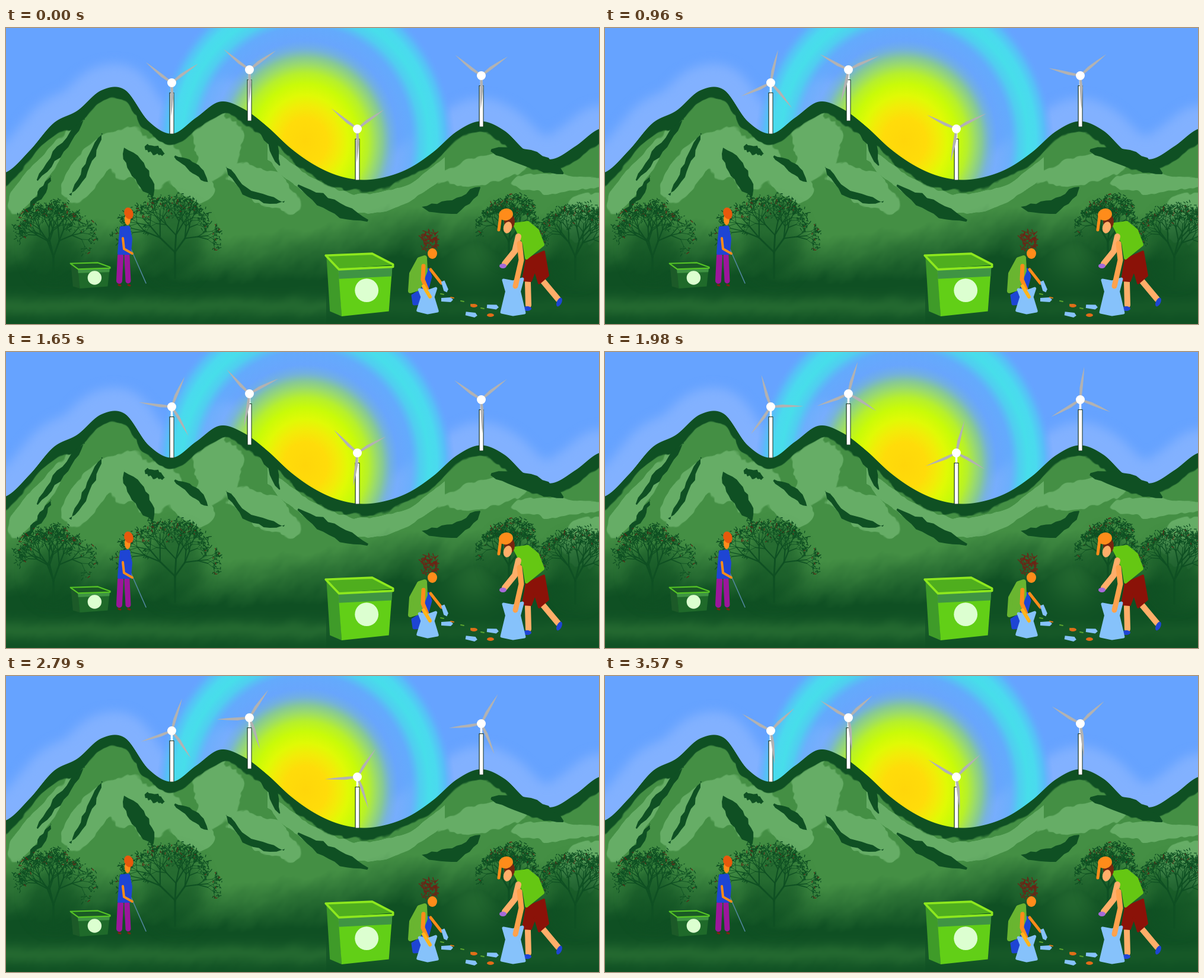
These frames come from a looping animation (1000x500 px, 3.6 s). An HTML page with a canvas:

```html
<!DOCTYPE html>
<html lang="en">
<head>
<meta charset="utf-8">
<title>Clean hills</title>
<style>
html, body { margin: 0; width: 100%; height: 100%; overflow: hidden; background: #66a3ff; }
canvas { display: block; width: 1000px; height: 500px; }
</style>
</head>
<body>
<canvas id="stage" width="1000" height="500"></canvas>
<script>
const W = 1000, H = 500, TAU = Math.PI * 2, RAD = Math.PI / 180;
const stage = document.getElementById('stage').getContext('2d');
const scenery = document.createElement('canvas');
scenery.width = W;
scenery.height = H;
const g = scenery.getContext('2d', { willReadFrequently: true });

const DARK = '#0f5023', SKIN = '#ff8c1a', PALE = '#ffae69', BAG = '#86c2fb', BLUE = '#1e45d4';
const TONES = [[15, 80, 35], [68, 143, 68], [102, 173, 102]];

let seed = 7;
const rnd = () => (seed = (seed * 16807) % 2147483647) / 2147483647;
const jitter = a => (rnd() * 2 - 1) * a;
const clamp = v => Math.min(1, Math.max(0, v));
const mix = (a, b, t) => a + (b - a) * t;
const bell = (x, mid, width) => Math.exp(-(((x - mid) / width) ** 2));

function hash(i, j) {
  const v = Math.sin(i * 127.1 + j * 311.7) * 43758.5453;
  return v - Math.floor(v);
}

function noise(x, y) {
  const i = Math.floor(x), j = Math.floor(y), ease = t => t * t * (3 - 2 * t);
  const u = ease(x - i), v = ease(y - j);
  return mix(mix(hash(i, j), hash(i + 1, j), u), mix(hash(i, j + 1), hash(i + 1, j + 1), u), v);
}

const grain = (x, y) => noise(x, y) * 0.6 + noise(x * 2.3, y * 2.3) * 0.27 + noise(x * 5.1, y * 5.1) * 0.13;

// Drawing helpers take flat x, y pairs
function trace(xy) {
  g.beginPath();
  for (let i = 0; i < xy.length; i += 2) g.lineTo(xy[i], xy[i + 1]);
}

function poly(color, ...xy) {
  trace(xy);
  g.fillStyle = color;
  g.fill();
}

function line(color, width, ...xy) {
  trace(xy);
  g.strokeStyle = color;
  g.lineWidth = width;
  g.lineCap = g.lineJoin = 'round';
  g.stroke();
}

// Filled shape with rounded corners
function soft(color, round, ...xy) {
  poly(color, ...xy);
  line(color, round, ...xy, xy[0], xy[1]);
}

function oval(color, x, y, rx, ry = rx, turn = 0) {
  g.beginPath();
  g.ellipse(x, y, rx, ry, turn * RAD, 0, TAU);
  g.fillStyle = color;
  g.fill();
}

// Skyline height every 40 px, joined by a spline
const RIDGE = [243, 206, 160, 139, 105, 104, 157, 178, 151, 124, 136, 166, 203, 231, 249, 256, 251, 236, 209, 174, 157, 173, 210, 221, 199, 170];

function ridge(x) {
  const i = Math.floor(x / 40), t = x / 40 - i;
  const at = k => RIDGE[Math.min(RIDGE.length - 1, Math.max(0, k))];
  const [a, b, c, d] = [at(i - 1), at(i), at(i + 1), at(i + 2)];
  return b + t / 2 * (c - a + t * (2 * a - 5 * b + 4 * c - d + t * (3 * (b - c) + d - a)));
}

function sky() {
  g.fillStyle = '#66a3ff';
  g.fillRect(0, 0, W, H);
  g.filter = 'blur(9px)';
  const skyline = [];
  for (let x = -20; x <= W + 20; x += 10) skyline.push(x, ridge(Math.min(W, Math.max(0, x))));
  line('#82b1ff', 78, ...skyline);
  g.filter = 'none';

  const R = 252, glow = g.createRadialGradient(0, 0, 0, 0, 0, R);
  const bands = { 0: '#ffd60a', 36: '#ffdc0a', 56: '#f2ec08', 72: '#e0fa05', 90: '#c9fb08', 106: '#b6f02c', 119: '#9cdc68',
    131: '#86c898', 143: '#76b4d4cc', 157: '#6aa9fa77', 178: '#62aefbaa', 193: '#50cdf0', 208: '#47deea', 222: '#4adaee', 236: '#58bdf8' };
  for (const r in bands) glow.addColorStop(r / R, bands[r]);
  glow.addColorStop(1, '#66a3ff00');
  g.save();
  g.translate(505, 192);
  g.scale(1, 1.09);
  g.fillStyle = glow;
  g.fillRect(-R, -R, R * 2, R * 2);
  g.restore();
}

// Sunlit faces: centre, radii and tilt
const FACES = [[60, 240, 82, 21, -52], [138, 235, 72, 30, -55], [235, 222, 82, 48, 10], [352, 190, 42, 60, 0],
  [310, 262, 48, 26, 40], [440, 272, 66, 30, 30], [800, 240, 78, 26, -12], [930, 262, 80, 18, 0], [975, 318, 42, 50, 0]]
  .map(([x, y, rx, ry, tilt]) => ({ x, y, rx, ry, cos: Math.cos(tilt * RAD), sin: Math.sin(tilt * RAD) }));

function sunlit(x, y, depth) {
  let best = x > 440 && x < 740 ? 1 - Math.abs(depth - 40) / 18 : -1;
  for (const f of FACES) {
    const dx = x - f.x, dy = y - f.y;
    best = Math.max(best, 1 - Math.hypot((dx * f.cos + dy * f.sin) / f.rx, (dy * f.cos - dx * f.sin) / f.ry));
  }
  return best;
}

function hills() {
  const image = g.getImageData(0, 0, W, H), px = image.data;
  for (let x = 0; x < W; x++) {
    const top = ridge(x);
    const shadeTop = 318 + 30 * bell(x, 390, 150) - 20 * bell(x, 720, 130);
    for (let y = Math.floor(top); y < H; y++) {
      const depth = y - top, n = grain((x + y * 0.5) / 34, y / 42);
      const body = clamp((depth - 8 - 22 * n) / 3);
      const face = clamp((sunlit(x, y, depth) + (n - 0.5) * 0.8 - 0.06) / 0.05) * body;
      const spot = 0.35 * bell(x, 790, 45) * bell(y, 380, 45) + 0.3 * bell(x, 985, 40) * bell(y, 385, 40);
      const grass = 0.38 * bell(y, 465 + 10 * n, 17) * (x < 540 ? 1 : 0.35);
      const light = Math.max(1 - clamp((y - shadeTop + 30 * (n - 0.5)) / 88), spot, grass);
      const edge = clamp(y - top + 0.5), at = (y * W + x) * 4;
      for (let c = 0; c < 3; c++) {
        const lit = mix(mix(TONES[0][c], TONES[1][c], body), TONES[2][c], face);
        px[at + c] = mix(px[at + c], mix(TONES[0][c], lit, light), edge);
      }
    }
  }
  g.putImageData(image, 0, 0);
}

// Dark cleft, thick in the middle, with a ragged edge
function cleft(x, y, u, v, width, bend) {
  const len = Math.hypot(u - x, v - y), nx = (y - v) / len, ny = (u - x) / len, left = [], right = [];
  for (let i = 0; i <= 12; i++) {
    const t = i / 12, arch = Math.sin(t * Math.PI), half = width / 2 * Math.sqrt(arch);
    const cx = mix(x, u, t) + nx * bend * arch, cy = mix(y, v, t) + ny * bend * arch;
    const a = half + jitter(2.5), b = half + jitter(2.5);
    left.push(cx + nx * a, cy + ny * a);
    right.unshift(cx - nx * b, cy - ny * b);
  }
  poly(DARK, ...left, ...right);
}

function clefts() {
  cleft(197, 203, 248, 284, 27, -3);
  cleft(234, 200, 268, 212, 14, 0);
  cleft(284, 217, 341, 260, 15, -5);
  cleft(371, 235, 469, 294, 13, 17);
  cleft(108, 282, 162, 178, 10, 4);
  cleft(28, 318, 76, 250, 9, 3);
  cleft(52, 257, 132, 153, 12, 0);
  cleft(388, 138, 462, 232, 16, -14);
  cleft(492, 266, 610, 326, 22, 5);
  cleft(702, 304, 800, 270, 24, 14);
  cleft(818, 206, 940, 246, 26, -6);
}

function leaf(x, y, size, color) {
  line(color, 1.3, x, y, x + jitter(size), y + jitter(size));
}

function branch(x, y, angle, length, depth) {
  const u = x + Math.cos(angle) * length, v = y + Math.sin(angle) * length;
  line(DARK, Math.max(0.8, depth * 0.7), x, y, u, v);
  if (!depth) {
    for (let i = 0; i < 5; i++) leaf(u + jitter(5), v + jitter(5), 4, rnd() < 0.08 ? '#5a2a16' : DARK);
    return;
  }
  for (const side of [-1, 0, 1]) {
    if (side || depth > 2) branch(u, v, angle + side * 0.58 + jitter(0.25), length * mix(0.66, 0.84, rnd()), depth - 1);
  }
}

function tree(x, base, height) {
  g.filter = 'blur(12px)';
  oval('#0f502390', x, base - height * 0.38, height * 0.3, height * 0.4);
  g.filter = 'none';
  branch(x, base, -Math.PI / 2, height * 0.27, 5);
}

function bin(x, y, w, h, face, side, inside, rim) {
  const at = (...uv) => uv.map((k, i) => i % 2 ? y + k * h : x + k * w);
  poly(side, ...at(0.02, 0.05, 0.2, 0.24, 0.24, 1, 0.07, 0.92));
  poly(face, ...at(0.19, 0.24, 0.97, 0.2, 0.92, 0.92, 0.24, 1));
  poly('#3f9443', ...at(0.19, 0.25, 0.97, 0.22, 0.96, 0.37, 0.2, 0.41));
  poly(inside, ...at(0.02, 0.05, 0.68, 0.02, 0.97, 0.19, 0.2, 0.25));
  line(rim, w / 32, ...at(0.01, 0.04, 0.68, 0.01, 0.98, 0.18, 0.98, 0.22, 0.2, 0.26, 0.01, 0.04));
  oval('#dcffd0', ...at(0.6, 0.59), w * 0.17);
}

function sweeper() {
  line('#5287a0', 1.6, 211, 374, 236, 431);
  line('#9c169c', 10, 193, 385, 191, 427);
  line('#9c169c', 9, 204, 385, 206, 427);
  for (const x of [190, 206]) line('#7a2312', 3, x, 434, x + 3, 435);
  soft(BLUE, 4, 194, 337, 207, 336, 211, 356, 209, 381, 190, 381, 192, 356);
  line(SKIN, 4, 197, 355, 199, 373, 213, 381);
  oval(SKIN, 205, 323, 5, 10);
  oval('#e8590c', 207, 313, 7.5, 10, -20);
}

function picker() {
  for (let i = 0; i < 90; i++) leaf(714 + jitter(13), 360 + jitter(17), 6, '#6d2416');
  soft(BLUE, 5, 686, 452, 702, 442, 712, 408, 716, 420, 704, 465, 688, 466);
  soft('#69b530', 8, 682, 444, 684, 415, 697, 391, 706, 388, 707, 410, 695, 440);
  oval(SKIN, 719, 381, 8, 9);
  line(SKIN, 7, 704, 402, 703, 425, 712, 447);
  line(SKIN, 5, 716, 408, 734, 431);
}

function sack(x, y, w, h) {
  soft(BAG, 5, x - w * 0.38, y + 2, x, y + 5, x + w * 0.38, y, x + w * 0.25, y + h * 0.35,
    x + w * 0.45, y + h - 3, x, y + h, x - w * 0.45, y + h - 4, x - w * 0.25, y + h * 0.35);
}

function collector() {
  line(PALE, 10, 880, 430, 881, 468);
  line(PALE, 10, 906, 428, 931, 458);
  oval(BLUE, 879, 474, 7, 4);
  oval(BLUE, 933, 463, 4, 8, 25);
  soft('#8b1208', 4, 878, 391, 907, 378, 914, 418, 899, 431, 892, 408, 885, 427, 872, 426);
  soft('#65c713', 6, 858, 332, 880, 329, 896, 342, 905, 366, 878, 388, 874, 363);
  oval('#76260f', 849, 327, 9, 13);
  oval(PALE, 846, 337, 7, 10, 15);
  oval(SKIN, 843, 315, 12, 10, -15);
  line(SKIN, 5, 834, 318, 831, 341);
  line(PALE, 10, 864, 352, 858, 377, 841, 398);
  sack(855, 424, 42, 60);
  line('#ffa24d', 9, 866, 364, 869, 392, 859, 436);
  oval('#a66ad8', 838, 402, 6, 4);
}

function litter() {
  for (const [x, y, turn] of [[744, 459, 0], [785, 484, 10], [821, 471, 5], [740, 437, 70]]) {
    g.save();
    g.translate(x, y);
    g.rotate(turn * RAD);
    poly(BAG, -10, -3, 6, -4, 10, 0, 6, 4, -10, 3);
    g.restore();
  }
  for (const [x, y] of [[789, 469], [817, 485]]) oval('#e26b18', x, y, 6, 3);
  for (let i = 0; i < 5; i++) line(i % 2 ? '#d8781b' : '#5aa32f', 2, 733 + i * 17, 449 + i * 6, 738 + i * 17, 450 + i * 6);
}

function paintScenery() {
  sky();
  hills();
  clefts();
  tree(80, 422, 132);
  tree(285, 422, 160);
  tree(960, 425, 145);
  tree(848, 390, 110);
  bin(108, 396, 69, 44, '#1f6a2a', '#1c5a28', '#1a5a25', '#55c425');
  sweeper();
  bin(538, 380, 117, 107, '#62cf17', '#3f9b29', '#4fae1e', '#8ee81e');
  picker();
  sack(711, 440, 36, 41);
  line('#ffb51c', 6, 704, 436, 715, 454);
  litter();
  collector();
}

const STEP = 30, STEPS = 120, TURN = 720, END = 120.3, QUICK = 9;
const FIRST = 218.5, BLADES = [[0, 56], [105.5, 55], [232.5, 57]];
// Hub, and the number of steps spent at the quick opening speed
const TURBINES = [[279.5, 92.5, 0], [410.5, 70.5, 20], [592.5, 170.5, 19], [801.5, 80.5, 15]];

function spin(n, knee) {
  if (n < knee) return QUICK * n;
  return mix(QUICK * knee, TURN, (n - knee) / (END - knee));
}

function turbine([x, y, knee], n) {
  const c = stage;
  const box = (color, left, top, w, h) => { c.fillStyle = color; c.fillRect(left, top, w, h); };
  c.save();
  c.translate(x, y);
  box('#fff', -1.8, 4, 3.6, 15);
  box('#15301d', -4, 16.5, 8, 70);
  box('#fff', -2.8, 17.5, 5.8, 68.5);
  c.fillStyle = '#b2b2b2';
  for (const [offset, length] of BLADES) {
    c.save();
    c.rotate((FIRST + offset + spin(n, knee)) * RAD);
    c.beginPath();
    c.moveTo(0, -1.5);
    c.lineTo(20, -3.4);
    c.quadraticCurveTo(38, -2.4, length, 0);
    c.quadraticCurveTo(36, 1.8, 0, 1.7);
    c.fill();
    c.restore();
  }
  c.fillStyle = '#fff';
  c.beginPath();
  c.arc(0, 0, 7.5, 0, TAU);
  c.fill();
  c.restore();
}

paintScenery();
const start = performance.now();

function draw() {
  const n = Math.floor((performance.now() - start) / STEP) % STEPS;
  stage.drawImage(scenery, 0, 0);
  TURBINES.forEach(t => turbine(t, n));
  requestAnimationFrame(draw);
}
draw();
</script>
</body>
</html>
```
